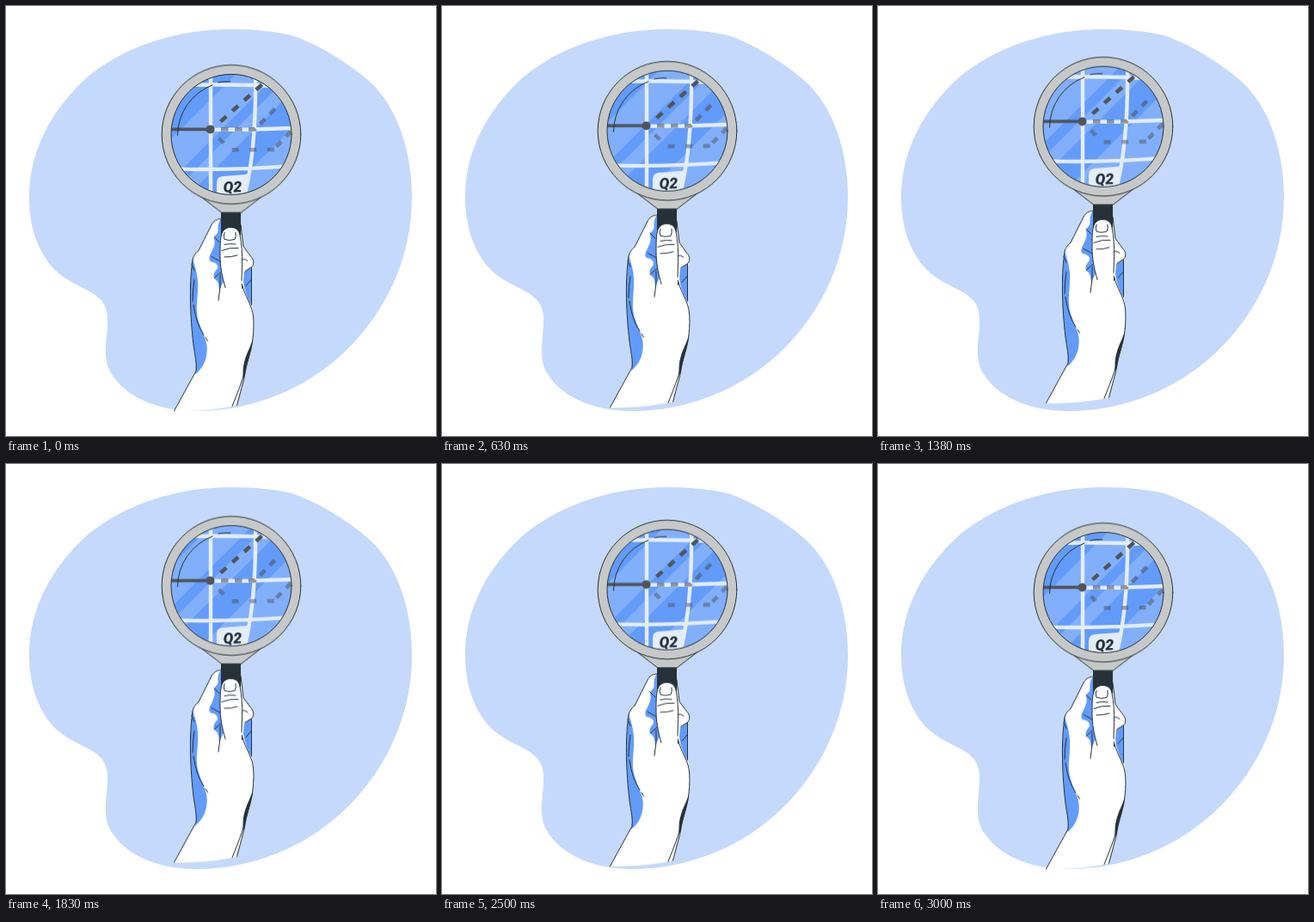
These frames come from a looping animation (500 by 500 pixels, 3040 ms). An HTML page without scripts:

```html
<!DOCTYPE html>
<html lang="en">
<head>
<meta charset="utf-8">
<title>Magnifying glass</title>
<style>
  html, body { margin: 0; width: 100%; height: 100%; overflow: hidden; background: #fff; }
  svg { display: block; width: 100%; height: 100%; }
  .float { animation: float 3040ms linear infinite; }
  .shine { fill: #fff; opacity: .2; animation: shine 3040ms linear infinite; }
  @keyframes float {
    0%, 98.68%, 100% { transform: translateY(.4px); }
    49.34% { transform: translateY(-9.6px); }
  }
  @keyframes shine {
    0%, 98.68%, 100% { transform: translateX(0); }
    49.34% { transform: translateX(-36px); }
  }
  .ink { fill: none; stroke: #263238; stroke-width: 1; stroke-linecap: round; stroke-linejoin: round; }
  .dark { fill: #263238; }
  .blue { fill: #629bfa; }
  .white { fill: #fff; }
  .grey { fill: #c7c9c9; }
  .grid { fill: none; stroke: #e3edfe; stroke-width: 4.4; }
  .dash { fill: none; stroke: #505459; stroke-width: 4.6; }
  .label { font: italic 900 17.5px Roboto, Inter, sans-serif; fill: #263238; text-anchor: middle; }
</style>
</head>
<body>
<svg viewBox="0 0 500 500">
  <defs>
    <clipPath id="lens"><circle cx="262" cy="149" r="70"/></clipPath>
  </defs>

  <path fill="#c5d9fc" d="M262 27C290 27 312 30 328 33C352 39 396 63 425 90C456 120 472 170 472 222C472 290 444 352 398 398C350 446 285 471 222 471C170 471 136 451 121 425C111 405 119 383 118 362C117 330 82 331 57 307C36 285 27 255 27 222C27 167 54 120 93 84C138 46 200 27 262 27Z"/>

  <g class="float">
    <!-- hand -->
    <path class="white" d="M250 247C245 247 241 250 239 254L224 284C219 288 217 292 216.500 298C213 325 214 360 218 394C220 408 222 415 221 424L195 471Q238 471 268 464L277 432C279 415 287 400 287 385C289 366 288 356 286 347L286 306C289 299 288 294 284 290L276 279L273 257Z"/>
    <path class="blue" d="M217 293C213 325 214 360 218 394C220 408 222 415 220 428C230 420 235 408 233.500 394C232 383 223 370 222 356C221 345 224 331 223 320C222 309 220 303 217 293Z"/>
    <path class="blue" d="M250 247Q246 251 246.500 260C247 266 242 265 242 270C244 277 241 280 239 286C236 290 235 296 239 297C245 298 248 302 245 306C241 310 240 315 244 318C248 321 247 325 248 330L254 318L251 260Z"/>
    <path class="blue" d="M277 309L285.500 303V348C281 340 277 330 276 320Z"/>
    <path class="dark" d="M287 386C285 395 279 404 277 414C275 421 276 427 275 434L278 429C279 416 286 402 287 386Z"/>
    <g class="ink">
      <path d="M250 247C245 247 241 250 239 254L224 284C219 288 217 292 216.500 298C213 325 214 360 218 394C220 408 222 415 221 424L195.500 470.500"/>
      <path d="M273 254L276 279L284 290C288 294 289 299 286 303L278 308M285.500 304V347M275 325C278 337 285 346 287 357C288.500 366 288 376 287 386C286 400 279 415 277 432L268.500 464"/>
      <path d="M276 430Q274 438 263 465"/>
      <path d="M219 318Q217 331 217 343M218 347Q221 369 230 382M232 385L234.500 389M216 300L219 307"/>
      <path d="M242 268L248 274M239 291L250 297M242 316L250 309M249 312Q250 326 247 342"/>
      <path d="M274 294Q278 293 281 296M279 325L285 318"/>
    </g>

    <!-- frame and handle -->
    <path class="grey" d="M221 217L251 240H273L303 217Z"/>
    <path class="ink" d="M221 217L251 240H273L303 217"/>
    <path class="dark" d="M250 239.500H273V267H250Z"/>
    <circle class="grey" cx="262" cy="149" r="81"/>
    <circle class="ink" cx="262" cy="149" r="80.800"/>

    <!-- lens -->
    <g clip-path="url(#lens)">
      <path class="blue" d="M192 79H332V219H192Z"/>
      <path class="shine" d="M116 230L286 60H334L164 230ZM180 230L350 60H372L202 230ZM244 230L414 60H490L320 230Z"/>
      <path class="grid" d="M238 75L238 222M290 75Q291.500 166 277 222M195 92Q260 89.500 330 93.500M238 143.500Q290 143.500 335 141.500M195 189Q265 191 332 185.500"/>
      <path fill="#e3edfc" d="M245 225V205Q245 198 252 197.500L284 195L279 225Z"/>
      <text class="label" x="263.500" y="216" transform="rotate(-2 264 216)">Q2</text>
      <path class="dash" style="stroke-width:3.600" d="M190 143H237"/>
      <path class="dash" stroke-dasharray="9 9.500" d="M249.500 134L302 87"/>
      <path class="dash" opacity=".58" stroke-dasharray="8.500 7.500" d="M250 143H289L318 114"/>
      <g class="dash" opacity=".5">
        <path stroke-dasharray="8 12.500" d="M247.500 153.500L262 167L312 166.500"/>
        <path stroke-dasharray="8 8" d="M314.500 163L334 143"/>
      </g>
      <circle cx="237.500" cy="143" r="5" fill="#505459"/>
      <path class="ink" d="M199.500 150A62.500 62.500 0 0 1 240 91.500M247 88.500Q253 87 261 87.500"/>
    </g>
    <circle class="ink" cx="262" cy="149" r="70"/>

    <!-- thumb -->
    <path class="white" d="M255 327C251 313 249 302 249 290C249 279 249 270 251 264C253 259 257 257 261 257C267 257 271 260 272 266C274 276 275 288 274.500 300L274 327L265 345Z"/>
    <g class="ink">
      <path d="M255 327C251 313 249 302 249 290C249 279 249 270 251 264C253 259 257 257 261 257C267 257 271 260 272 266C274 276 275 288 274.500 300L274 319M274.500 323V328"/>
      <path d="M254 263Q252.500 267 254 271Q260 273 266 271Q268 267 267 263"/>
      <path d="M254 277Q261 275.500 267 276.500M251 284Q260 280 270 281M254 291.500Q261 292 269 289.500"/>
    </g>
  </g>
</svg>
</body>
</html>
```
